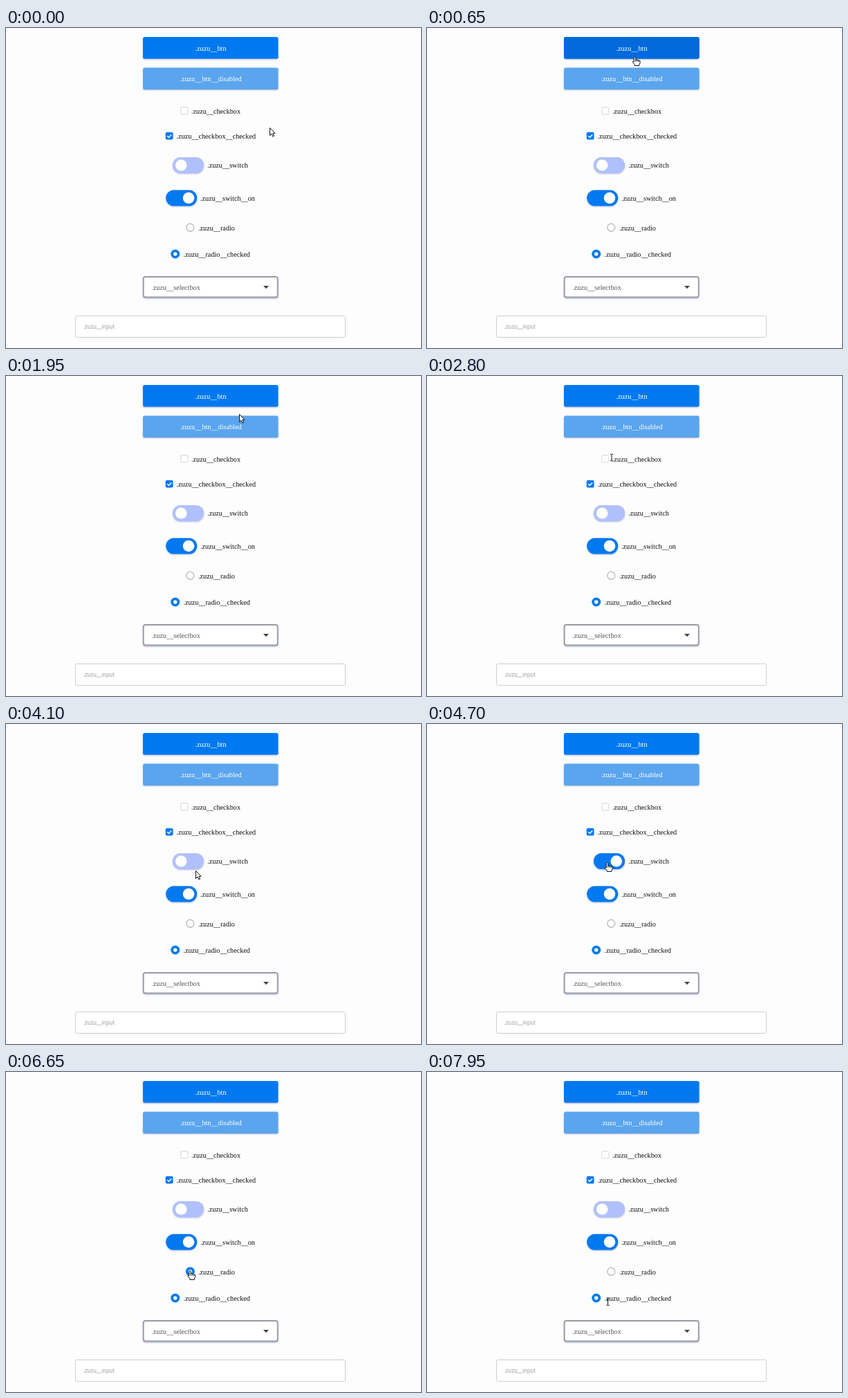
Animation of 600 by 463 pixels, one loop 8000 ms. Source, as an HTML page:

```html
<!DOCTYPE html>
<html lang="en">
<head>
<meta charset="utf-8">
<title>UI controls</title>
<style>
  html, body { margin: 0; width: 100%; height: 100%; overflow: hidden; background: #fdfdfe; }
  svg { display: block; width: 600px; height: 463px; }
  text { font: 10.2px "Liberation Serif", "Times New Roman", serif; fill: #111; }
  .mid { text-anchor: middle; fill: #fff; }
  .blue { fill: #0079f0; }
  .shade { filter: drop-shadow(0 1px 1px rgba(60, 80, 150, .4)); }
  .box { fill: #fff; stroke: #d6d6da; }
  .tick { fill: none; stroke: #fff; stroke-width: 1.5; }
  .ring { fill: #fff; stroke: #c6c6cb; stroke-width: 1.7; }
  .dot { fill: #fff; stroke: #0079f0; stroke-width: 3.8; }
  .knob { fill: #fff; }
  #cursor path { fill: #fff; stroke: #111; stroke-width: 1; stroke-linejoin: round; }
  #cursor #I { fill: none; }
</style>
</head>
<body>
<svg viewBox="0 0 600 463">
  <defs>
    <g id="checked">
      <rect class="blue" width="10.8" height="10.8" rx="2"/>
      <path class="tick" d="M2.4 5.5L4.6 7.7L8.5 3.4"/>
    </g>
    <rect id="track" width="45" height="23" rx="11.5"/>
  </defs>

  <rect class="blue shade" x="198" y="13" width="195.5" height="31.5" rx="2.5"/>
  <rect id="hover" x="198" y="13" width="195.5" height="31.5" rx="2.5" fill="#0069dc"/>
  <text class="mid" x="296" y="32.5">.zuzu__btn</text>
  <rect class="shade" x="198" y="57.5" width="195.5" height="31.5" rx="2.5" fill="#5aa5ee"/>
  <text class="mid" x="296" y="77">.zuzu__btn__disabled</text>

  <rect class="box" x="252.7" y="114.7" width="10.2" height="10.2" rx="1.5"/>
  <use id="check" href="#checked" x="252.4" y="114.4"/>
  <text x="268" y="123.5">.zuzu__checkbox</text>
  <use href="#checked" x="230.7" y="150.8"/>
  <text x="246.5" y="159.7">.zuzu__checkbox__checked</text>

  <g class="shade">
    <use href="#track" x="241" y="187" fill="#b0c0fc"/>
    <use id="on" class="blue" href="#track" x="241" y="187"/>
  </g>
  <circle id="knob" class="knob" cx="253.2" cy="198.5" r="8.3"/>
  <text x="291.2" y="202">.zuzu__switch</text>
  <use class="blue shade" href="#track" x="231.2" y="234.5"/>
  <circle class="knob" cx="264" cy="246" r="8.3"/>
  <text x="281" y="249.5">.zuzu__switch__on</text>

  <circle class="ring" cx="266.3" cy="288.7" r="5.5"/>
  <circle id="radio" class="dot" cx="266.3" cy="288.7" r="4.6"/>
  <text x="278" y="292.5">.zuzu__radio</text>
  <circle class="dot" cx="244.7" cy="327" r="4.6"/>
  <text x="256.5" y="330.7">.zuzu__radio__checked</text>

  <rect class="shade" x="198.7" y="360" width="194" height="29.5" rx="3" fill="#fff" stroke="#9c9ba4" stroke-width="1.8"/>
  <text x="210.3" y="378.6" style="fill:#555">.zuzu__selectbox</text>
  <path d="M372 373H380L376 377.3Z" fill="#444"/>

  <rect x="100.5" y="416.5" width="390" height="31" rx="2" fill="#fff" stroke="#c9ced6"/>
  <text x="111.3" y="435" style="font:8.3px Roboto,sans-serif;fill:#a2a2a6">.zuzu__input</text>

  <g id="cursor">
    <path id="A" d="M.5 .5V11.5L3 9.2L4.8 13L6.6 12.2L4.9 8.4H8Z"/>
    <path id="H" d="M-1.2 8V1.3Q0 -.3 1.2 1.3V5Q2.6 4.2 3.4 5.4Q4.8 4.7 5.6 6Q7.4 5.4 7.6 7.2V9.5L6.2 12V13.5H-.2V12L-3.2 8.3Q-3 6.4 -1.2 8M1.2 5V7.5M3.4 5.4V7.7M5.6 6V8"/>
    <path id="I" d="M-2 -4.8H-.6L0 -4.2L.6 -4.8H2M0 -4.2V4.2M-2 4.8H-.6L0 4.2L.6 4.8H2"/>
  </g>
</svg>
<script>
const $ = id => document.getElementById(id);
const LOOP = 8000, STEP = 50;

// time, x, y, pointer: A arrow, H hand, I text beam
const path = [
  [0, 381, 144, "A"], [550, 305, 44, "H"], [650, 300.5, 41, "H"], [1150, 300.5, 41, "H"],
  [1450, 322, 46, "A"], [1750, 337, 53, "A"], [1900, 337, 53, "A"], [1950, 337, 55, "A"],
  [2100, 323, 64, "A"], [2200, 323, 64, "A"], [2350, 330, 62, "A"], [2450, 330, 62, "A"],
  [2750, 272, 116, "I"], [2800, 267, 118, "I"], [2850, 262, 118, "H"], [3300, 262, 118, "H"],
  [3400, 259.5, 121, "H"], [3600, 259.5, 121, "H"], [3700, 262, 140, "A"], [3950, 274, 218, "A"],
  [4050, 274, 218, "A"], [4100, 274, 212, "A"], [4250, 262, 202, "H"], [4400, 247, 195, "H"],
  [4500, 260.5, 200, "H"], [4800, 260.5, 200, "H"], [4850, 251.5, 197, "H"], [5550, 251.5, 197, "H"],
  [5700, 255, 212, "A"], [5800, 258, 236, "H"], [5950, 262, 260, "A"], [6100, 265, 285, "H"],
  [6200, 266, 287, "H"], [7150, 266, 287, "H"], [7250, 265.5, 288, "H"], [7800, 265.5, 288, "H"],
  [7900, 263, 312, "A"], [7950, 261.5, 333, "I"], [LOOP, 261.5, 333, "I"]
];

const ramp = (t, from, to) => Math.min(1, Math.max(0, (t - from) / (to - from)));
const show = (id, visible) => $(id).setAttribute("opacity", +visible);

function draw(t) {
  const i = path.findIndex(key => key[0] > t);
  const [t0, x0, y0, kind] = path[i - 1], [t1, x1, y1] = path[i];
  let k = ramp(t, t0, t1);
  k *= k * (3 - 2 * k);
  $("cursor").setAttribute("transform", `translate(${x0 + (x1 - x0) * k} ${y0 + (y1 - y0) * k})`);
  for (const id of "AHI") show(id, id === kind);

  show("hover", ramp(t, 500, 600) - ramp(t, 1400, 1500));
  show("check", t >= 3150 && t < 3650);
  show("radio", t >= 6650 && t < 7650);
  const on = t < 5550 ? ramp(t, 4600, 4700) : 0;
  show("on", on);
  $("knob").setAttribute("cx", 253.2 + 20.6 * on);
}

const start = performance.now();
function tick() {
  const t = (performance.now() - start) % LOOP;
  draw(Math.floor(t / STEP) * STEP);
  requestAnimationFrame(tick);
}
tick();
</script>
</body>
</html>
```
